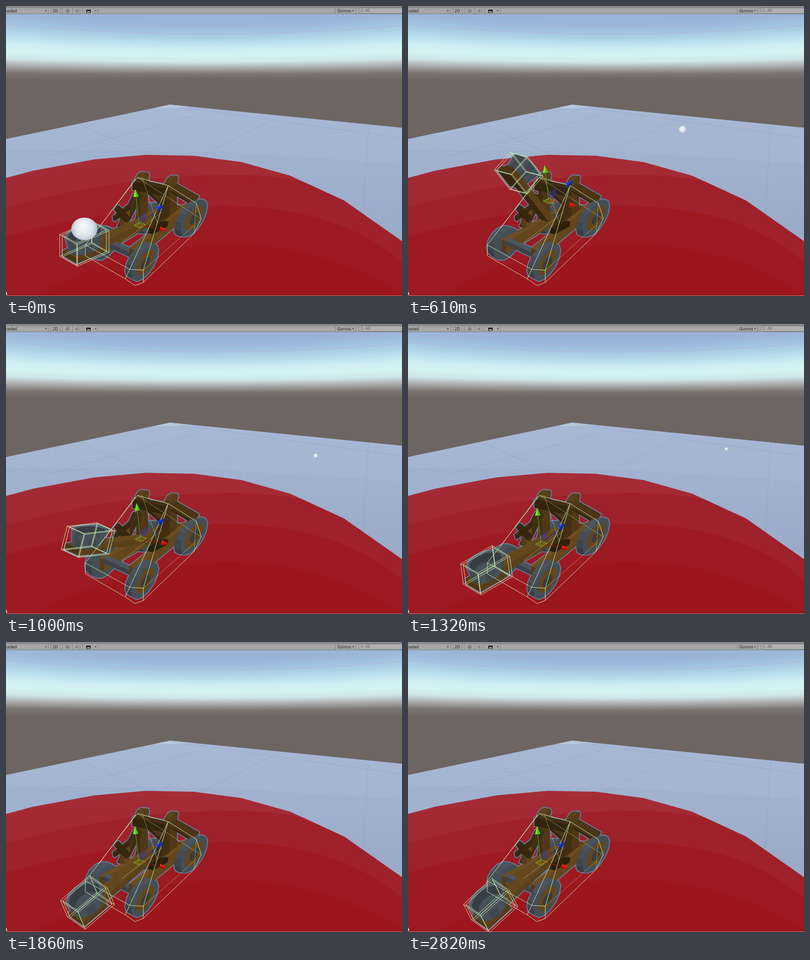
An HTML page with a canvas for the animation above (2.97 s loop, 874 by 641 pixels).

```html
<!DOCTYPE html>
<html lang="en">
<head>
<meta charset="utf-8">
<title>Catapult</title>
<style>
  html, body { margin: 0; width: 100%; height: 100%; overflow: hidden; background: #6c6562; }
  canvas { display: block; }
</style>
</head>
<body>
<canvas id="stage" width="874" height="641"></canvas>
<script>
const W = 874, H = 641, LOOP = 2970, STEP = 78.6, LAST = 36;
const RELEASE = 6, ROLL = 9, GONE = 22;
const ctx = document.getElementById('stage').getContext('2d');
const WIRE = '#c9edb9', OUTLINE = '#6a7a9b';
const wood = light => `hsl(35 56% ${light}%)`;
const slate = light => `hsl(206 10% ${light}%)`;

const asPath = pts => new Path2D('M' + (typeof pts === 'string' ? pts : pts.join(' ')) + 'Z');
const fill = (color, path) => { ctx.fillStyle = color; ctx.fill(path); };
const poly = (color, pts) => fill(color, asPath(pts));
function line(color, pts, width = 1) {
  ctx.strokeStyle = color;
  ctx.lineWidth = width;
  ctx.stroke(new Path2D('M' + pts));
}
function vertical(top, bottom, ...colors) {
  const g = ctx.createLinearGradient(0, top, 0, bottom);
  colors.forEach((c, i) => g.addColorStop(i / (colors.length - 1), c));
  return g;
}
const lerp = (a, b, f) => a + (b - a) * f;
const turn = (a, b, c) => (b[0] - a[0]) * (c[1] - b[1]) - (b[1] - a[1]) * (c[0] - b[0]);
const circle = (n, r, x = 0, y = 0) => Array.from({ length: n }, (_, i) =>
  [x + r * Math.cos(i * 2 * Math.PI / n), y + r * Math.sin(i * 2 * Math.PI / n)]);

function drawSky() {
  fill('#6c6562', asPath('0,18 874,18 874,641 0,641'));
  // the bands sag towards the middle, so each column has its own top
  for (let x = 0; x < W; x += 6) {
    const lift = 27 * ((x + 3) / 437 - 1) ** 2;
    ctx.fillStyle = vertical(30 - lift, 164, '#9ab3d6', '#9bb6d9', '#a0c2e0', '#abd0e6', '#bbe0ed',
      '#cfeff4', '#d5f2f4', '#cfe6e8', '#aaabab', '#7b7572', '#6c6562');
    ctx.fillRect(x, 18, 6, 146);
  }
  line('rgba(174,182,216,.7)', '0,40Q437,82 874,43', 2);
  for (let i = 0; i < 7; i++)
    line('rgba(130,124,122,.14)', `0,${176 + i * 14}L${220 + i * 70},${166 + i * 4}L874,${180 + i * 12}`);
}

function drawGround() {
  const platform = asPath('0,294 362,218 874,269 874,641 0,641');
  fill(vertical(218, 520, '#a7b8d5', '#a3b5d1', '#9bacca'), platform);
  poly('#b5c9dc', '362,218 410,223 372,226 330,225');
  ctx.save();
  ctx.clip(platform);
  poly('rgba(145,162,195,.2)', '0,318 470,322 874,348 874,641 0,641');
  for (const pts of ['800,262L788,470', '606,243L430,332', '425,240L80,335', '140,252L320,330', '362,220L874,292'])
    line('rgba(105,122,155,.2)', pts);
  for (let i = 0; i < 9; i++) line('rgba(105,122,155,.06)', `0,${300 + i * 8}L${520 + i * 40},${252 + i * 2}`);
  ctx.restore();

  const disc = asPath('0,380 60,364 195,339 308,329 415,331 520,345 627,375 746,430 874,520 874,641 0,641');
  fill(vertical(329, 440, '#a52d37', '#a12732'), disc);
  ctx.save();
  ctx.clip(disc);
  fill('#9f212b', new Path2D('M0,446Q260,372 500,373T874,490V641H0Z'));
  fill('#9d1a22', new Path2D('M0,510Q260,436 500,442T874,566V641H0Z'));
  fill('#9b161d', new Path2D('M60,641Q280,526 490,526T874,636V641Z'));
  ctx.restore();
  line('#b98a8c', '0,640.5H874');
  poly('#e4e4e4', '0,630 3,638 0,638');
}

function drawToolbar() {
  ctx.fillStyle = vertical(0, 18, '#8d8d8d', '#a9a9a9', '#a2a2a2');
  ctx.fillRect(0, 0, W, 18);
  ctx.fillStyle = '#6f6f6f';
  ctx.fillRect(0, 2, W, 1);
  ctx.fillStyle = '#828282';
  ctx.fillRect(0, 17, W, 1);
  for (const x of [93, 99, 119, 124, 147, 169, 203, 726, 771]) ctx.fillRect(x, 4, 1, 13);
  ctx.fillStyle = '#151515';
  ctx.font = '9px "Open Sans", sans-serif';
  ctx.textAlign = 'right';
  ctx.fillText('Shaded', 24, 14);
  ctx.textAlign = 'left';
  ctx.fillText('2D', 103, 14);
  ctx.fillText('Gizmos', 731, 14);
  for (const x of [88, 198, 766, 790]) poly('#333', [[x - 2, 9.5], [x + 2, 9.5], [x, 12]]);
  const rays = circle(8, 5, 136, 11);
  circle(8, 3.5, 136, 11).forEach((p, i) => line('#444', `${p}L${rays[i]}`));
  ctx.beginPath(); ctx.arc(136, 11, 2.2, 0, 7); ctx.stroke();
  poly('#858585', '153,9 156,9 159,6 159,16 156,13 153,13');
  line('#858585', '161,8Q164,11 161,14M163,7Q166,11 163,15');
  ctx.fillStyle = '#222';
  ctx.fillRect(177, 8, 10, 7);
  poly('#bbb', '178,14 180,11 182,12 184,11 186,14');
  ctx.beginPath();
  ctx.roundRect(778.5, 4.5, 110, 12, 6);
  ctx.fillStyle = '#b0b0b0'; ctx.fill();
  ctx.strokeStyle = '#757575'; ctx.stroke();
  ctx.beginPath(); ctx.arc(786, 10, 2.7, 0, 7); ctx.stroke();
  ctx.fillStyle = '#555';
  ctx.fillText('All', 793, 13);
}

function drawBall(x, y, rx, ry = rx) {
  const g = ctx.createRadialGradient(x - rx * .1, y - ry * .35, rx * .1, x, y, rx * 1.05);
  g.addColorStop(0, '#f4f8f8');
  g.addColorStop(.6, '#dde5ea');
  g.addColorStop(1, '#a9b4c2');
  ctx.fillStyle = g;
  ctx.beginPath();
  ctx.ellipse(x, y, rx, ry, 0, 0, 7);
  ctx.fill();
}

// Quick throw, then the arm sinks back along an S-curve; degrees above its loaded position.
const swing = step => step < 4 ? 79 * (step / 4) ** 2 : -24 + 116 / (1 + Math.exp(.297 * (step - 10.96)));

// Bucket frame for an arm angle: centre and outward (x), sideways (y) and upward (z) edges.
function bucketFrame(degrees) {
  const c = Math.cos(degrees * Math.PI / 180), s = Math.sin(degrees * Math.PI / 180);
  const out = [-70 * c, 31 * c - 75 * s], up = [45 * s, -20 * s - 48 * c];
  const shrink = 1 - .12 * s * s;
  return {
    centre: [313 + 2 * out[0] + .15 * up[0], 470 + 2 * out[1] + .15 * up[1]],
    x: out.map(v => v * shrink), y: [39, 22 - 14 * s], z: up.map(v => v * shrink), tilt: s
  };
}

// Chassis space: length towards the bucket, side towards the viewer, height.
const chassis = (l, s, h) => [313 - 65 * l + 40 * s, 507 + 46 * l + 9 * s + 11 * l * s - 70 * h];

function drawCatapult({ centre, x, y, z }) {
  const at = (a, b, c) => [0, 1].map(i => centre[i] + a * x[i] + b * y[i] + c * z[i]);
  const shapes = [];
  const add = (color, pts) => shapes.push([color, asPath(pts)]);

  // Extrudes a profile sideways and keeps the faces turned to the viewer.
  function prism(paint, light, profile, s0, s1, map = chassis) {
    profile.forEach((p, i) => {
      const q = profile[(i + 1) % profile.length];
      const quad = [map(p[0], s1, p[1]), map(q[0], s1, q[1]), map(q[0], s0, q[1]), map(p[0], s0, p[1])];
      const upward = (p[0] - q[0]) / Math.hypot(p[0] - q[0], p[1] - q[1]);
      if (turn(...quad) < 0) add(paint(light * (.85 + .25 * upward)), quad);
    });
    add(paint(light), profile.map(p => map(p[0], s1, p[1])));
  }
  function bar(light, l0, h0, l1, h1, s0, s1, thick, paint = wood, map = chassis) {
    const len = Math.hypot(l1 - l0, h1 - h0);
    const nl = -(h1 - h0) / len * thick / 2, nh = (l1 - l0) / len * thick / 2;
    prism(paint, light, [[l0 + nl, h0 + nh], [l0 - nl, h0 - nh], [l1 - nl, h1 - nh], [l1 + nl, h1 + nh]], s0, s1, map);
  }
  function wheel(l, side) {
    const face = side * 1.2 + (side < 0 ? .18 : 0);
    prism(slate, 30, circle(14, .45, l), face - .37, face);
    if (side < 0) return;
    prism(wood, 25, circle(14, .31, l), face, face + .01);
    prism(slate, 24, circle(8, .15, l), face, face + .06);
    prism(wood, 20, circle(8, .07, l), face + .06, face + .07);
  }
  function sideFrame(side) {
    const s0 = side * .8 - .12, s1 = side * .8 + .12;
    bar(20, -.3, .1, -.3, 1.5, s0, s1, .25);
    prism(wood, 22, circle(10, .17, -.3, 1.55), s0, s1);
    bar(19, -.35, 1.35, -1.1, .35, s0, s1, .2);
    bar(16, -.15, 1.1, .4, .35, s0, s1, .2);
    bar(25, -1, .18, side < 0 ? 1.15 : .95, .2, side * .65 - .13, side * .65 + .13, .35);
  }

  wheel(-.83, -1);
  wheel(.83, -1);
  sideFrame(-1);
  for (const l of [-.83, .83]) bar(30, l - .07, .1, l + .07, .1, -1, 1, .15, slate);
  bar(21, -.9, .2, -.65, .2, -.6, .6, .3);
  bar(15, -.15, 1.26, -.15, 1.53, -1, 1, .12);
  bar(25, .4, .45, .4, .9, -.75, -.5, .2);
  bar(14, .66, .77, .14, .88, -.85, -.75, .15);
  bar(14, .57, 1.08, .17, .47, -.85, -.75, .15);

  // arm, cradle and cup
  const open = x[0] * y[1] - x[1] * y[0] < 0;
  const ring = (r, c) => circle(12, r).map(p => at(p[0], p[1], c));
  const base = ring(.43, -.22), rim = ring(.53, .46);
  const cup = () => {
    add(slate(26), open ? base : rim);
    base.forEach((p, i) => {
      const j = (i + 1) % base.length;
      if (turn(p, base[j], rim[j]) < 0) add(slate(i % 2 ? 31 : 28), [p, base[j], rim[j], rim[i]]);
    });
    if (!open) return add(slate(31), base);
    add(slate(36), rim);
    add(slate(24), ring(.46, .42));
    add(slate(31), ring(.34, .1));
  };
  const arm = () => {
    bar(23, -2.1, -.25, .46, -.25, -.22, .22, .28, wood, at);
    bar(22, -.35, -.33, .46, -.33, -.4, .4, .26, wood, at);
  };
  for (const part of open ? [arm, cup] : [cup, arm]) part();

  sideFrame(1);
  bar(11, .4, .55, -.1, .4, .7, .95, .13);
  wheel(-.83, 1);
  wheel(.83, 1);

  ctx.lineJoin = 'round';
  ctx.strokeStyle = OUTLINE;
  ctx.lineWidth = 4;
  for (const [, path] of shapes) ctx.stroke(path);
  for (const [color, path] of shapes) fill(color, path);

  // collider cages
  line(WIRE, '290,379L358,397 420,436 431,470 415,503 303,611 285,618 263,603 175,552 175,528 290,379');
  line(WIRE, '263,603L273,582 303,584 303,611M273,582L358,397 303,584M175,528L273,582M205,490L286,382');
  line('rgba(201,237,185,.5)', '290,379L380,438 430,470M415,503L420,436M303,584L415,485M255,523L345,455M300,378L334,480');
  for (const [sa, sb] of [[.5, .5], [.47, .41]]) {
    const corner = (i, c) => at(i % 3 ? -sa : sa, i < 2 ? sb : -sb, c);
    for (let i = 0; i < 4; i++) {
      const j = (i + 1) % 4;
      line(WIRE, `${corner(i, -.5)}L${corner(i, .5)} ${corner(j, .5)}M${corner(i, -.5)}L${corner(j, -.5)}`);
    }
  }
}

function drawHandles(degrees) {
  const lift = 1 / (1 + Math.exp((32 - degrees) / 11));
  const cone = (dx, dy, color, shade) => {
    const len = Math.hypot(dx, dy), ux = dx / len, uy = dy / len;
    line(shade, `0,0L${dx},${dy}`);
    const left = [dx - uy * 6, dy + ux * 6], right = [dx + uy * 6, dy - ux * 6];
    const tip = [dx + ux * 17, dy + uy * 17];
    poly(color, [left, right, tip]);
    poly(shade, [left, [dx, dy], tip]);
  };
  ctx.save();
  ctx.translate(293 + 19 * lift, 487 - 62 * lift);
  poly('rgba(62,52,150,.5)', '0,-18 15,-29 16,-12 1,-3');
  poly('rgba(120,125,15,.6)', '-12,1 2,-6 14,0 0,7');
  line('#8fae25', '-12,1L2,-6 14,0 0,7Z');
  cone(-7, -62, '#74f01e', '#4fc016');
  cone(46, 9, '#f01c10', '#a0160e');
  cone(41, -34, '#1738f0', '#1024a0');
  ctx.restore();
}

function drawPointer(step) {
  const enter = (step - 25) / 4, leave = (step - 29) / 6;
  const spot = enter < 1 ? [lerp(838, 798, enter), lerp(109, 552, enter)] : [lerp(798, 670, leave), lerp(552, 630, leave)];
  ctx.save();
  ctx.translate(...spot);
  ctx.scale(.72, .72);
  const arrow = asPath('0,0 0,16 4,12.5 6.5,18 9,17 6.5,11.5 11.5,11.5');
  fill('#fff', arrow);
  ctx.strokeStyle = '#111';
  ctx.lineWidth = 1;
  ctx.stroke(arrow);
  ctx.restore();
}

// The ball recedes into the distance, lands and rolls to the far edge.
function drawFlight(step) {
  const y = step < ROLL ? 266 + 7 * (step - 7) ** 2 : 296 - 44 * ((step - ROLL) / 12) ** 2;
  drawBall(745 - 550 / (step - 4.05), y, 2 + 26 / (step - 4));
}

function draw(step) {
  const degrees = swing(step), frame = bucketFrame(degrees);
  const { centre, z, tilt } = frame;
  const loaded = () => {
    const rise = .67 * Math.sqrt(1 - tilt * tilt), size = 1 - .4 * tilt;
    drawBall(centre[0] + z[0] * rise, centre[1] + z[1] * rise, 29 * size, 25 * size);
  };
  drawSky();
  drawGround();
  if (step >= RELEASE && step < GONE) drawFlight(step);
  if (step < RELEASE && degrees > 45) loaded();
  drawCatapult(frame);
  if (step < RELEASE && degrees <= 45) loaded();
  drawHandles(degrees);
  if (step >= 25 && step < LAST) drawPointer(step);
  ctx.lineWidth = 1;
  drawToolbar();
}

let shown = -1;
function tick() {
  const step = Math.min(LAST, Math.floor((performance.now() % LOOP + 23) / STEP));
  if (step !== shown) draw(shown = step);
  requestAnimationFrame(tick);
}
tick();
</script>
</body>
</html>
```
